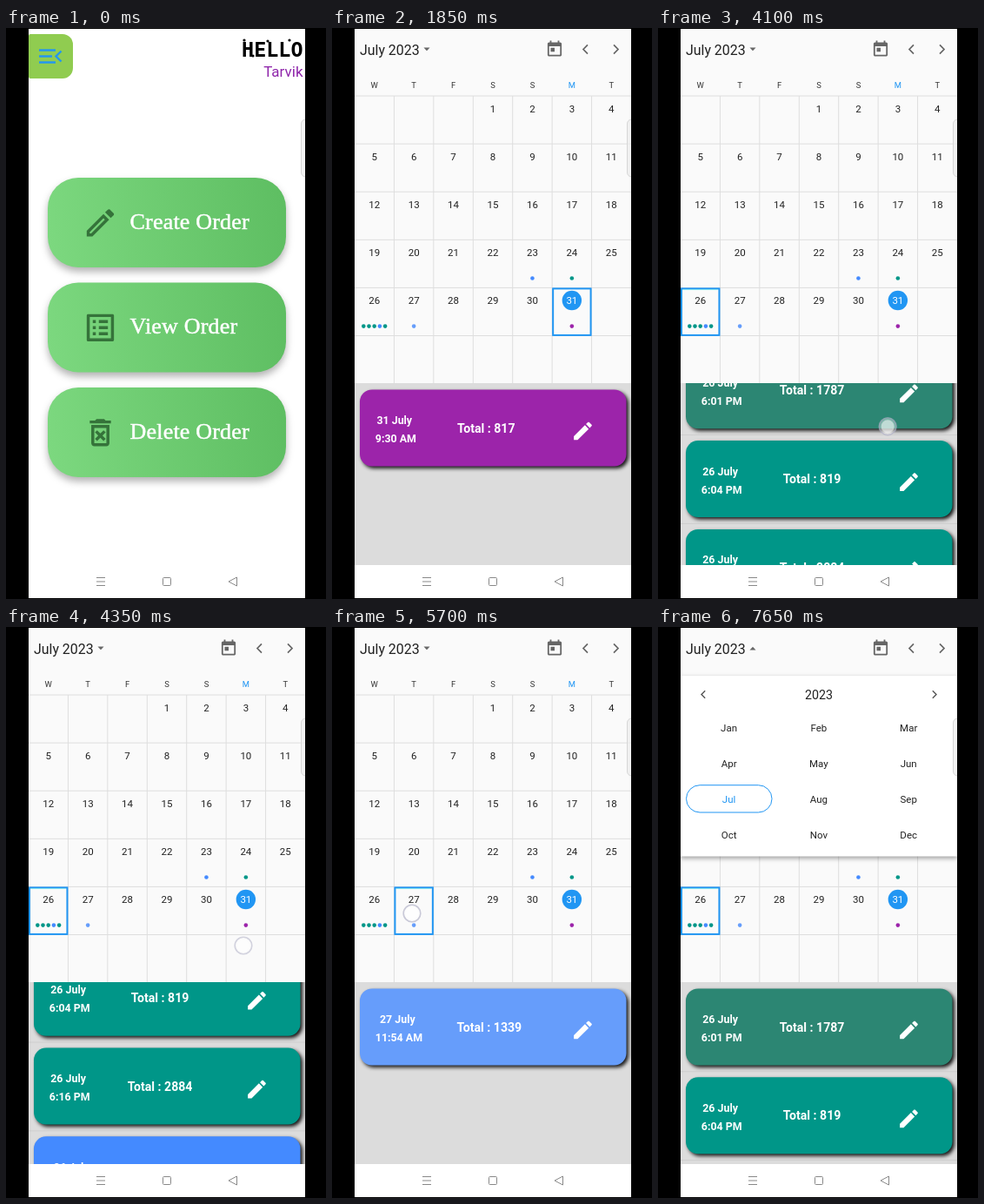
Recreate the animation shown at these times as an HTML page with a canvas. Size 368x656 px, loop 8000 ms.

```html
<!DOCTYPE html>
<html lang="en">
<head>
<meta charset="utf-8">
<title>Order calendar</title>
<style>
html, body { margin: 0; width: 100%; height: 100%; overflow: hidden; background: #000; }
canvas { display: block; width: 368px; height: 656px; }
</style>
</head>
<body>
<canvas id="stage"></canvas>
<script>
const LOOP = 8000;
const BLUE = '#2196f3', TEAL = '#009688', INK = '#222';
const SANS = 'Roboto, sans-serif', SERIF = '"Liberation Serif", serif';
const COL = 318 / 7, ROW = 55.1, GRID_TOP = 78, PITCH = 101.8;

const canvas = document.getElementById('stage');
const dpr = window.devicePixelRatio || 1;
canvas.width = 368 * dpr;
canvas.height = 656 * dpr;
const c = canvas.getContext('2d');

const icons = {
  edit: 'M3 17.25V21h3.75L17.81 9.94l-3.75-3.75L3 17.25zM20.71 7.04c.39-.39.39-1.02 0-1.41l-2.34-2.34c-.39-.39-1.02-.39-1.41 0l-1.83 1.83 3.75 3.75 1.83-1.83z',
  pencil: 'M14.06 9.02l.92.92L5.92 19H5v-.92l9.06-9.06M17.66 3c-.25 0-.51.1-.7.29l-1.83 1.83 3.75 3.75 1.83-1.83c.39-.39.39-1.02 0-1.41l-2.34-2.34c-.2-.2-.45-.29-.71-.29zm-3.6 3.19L3 17.25V21h3.75L17.81 9.94l-3.75-3.75z',
  list: 'M19 5v14H5V5h14m1.1-2H3.9c-.5 0-.9.4-.9.9v16.2c0 .4.4.9.9.9h16.2c.4 0 .9-.5.9-.9V3.9c0-.5-.5-.9-.9-.9zM11 7h6v2h-6zM11 11h6v2h-6zM11 15h6v2h-6zM7 7h2v2H7zM7 11h2v2H7zM7 15h2v2H7z',
  bin: 'M14.12 10.47L12 12.59l-2.13-2.12-1.41 1.41L10.59 14l-2.12 2.12 1.41 1.41L12 15.41l2.12 2.12 1.41-1.41L13.41 14l2.12-2.12zM15.5 4l-1-1h-5l-1 1H5v2h14V4zM6 19c0 1.1.9 2 2 2h8c1.1 0 2-.9 2-2V7H6v12zM8 9h8v10H8V9z',
  today: 'M19 3h-1V1h-2v2H8V1H6v2H5c-1.1 0-2 .9-2 2v14c0 1.1.9 2 2 2h14c1.1 0 2-.9 2-2V5c0-1.1-.9-2-2-2zm0 16H5V8h14v11zM7 10h5v5H7z'
};
for (const k in icons) icons[k] = new Path2D(icons[k]);

const orders = {
  31: [['9:30 AM', 817, '#9c24aa']],
  26: [['6:01 PM', 1787, '#2c8673'], ['6:04 PM', 819, TEAL], ['6:16 PM', 2884, TEAL],
       ['10:01 PM', 765, '#448aff'], ['10:04 PM', 1250, TEAL]],
  27: [['11:54 AM', 1339, '#669dfb']]
};
const marks = {
  23: ['#448aff'], 24: [TEAL], 26: [TEAL, TEAL, TEAL, '#448aff', TEAL],
  27: ['#669dfb'], 31: ['#9c24aa']
};
// start, end, from x, y, to x, y, move start, move end
const touches = [
  [640, 880, 205, 345, 205, 345, 0, 1],
  [3050, 3330, 57, 326, 57, 326, 0, 1],
  [3930, 4400, 260, 501, 273, 366, 3950, 4350],
  [4680, 5120, 253, 453, 262, 363, 4780, 5080],
  [5420, 5780, 92, 329, 92, 329, 0, 1],
  [6160, 6440, 57, 328, 57, 328, 0, 1],
  [6920, 7200, 72, 25, 72, 25, 0, 1]
];

const clamp = v => Math.max(0, Math.min(1, v));
const span = (t, a, b) => clamp((t - a) / (b - a));
const out = p => 1 - Math.pow(1 - p, 2.2);
const smooth = p => p * p * (3 - 2 * p);
const mix = (a, b, p) => a + (b - a) * p;

function rect(x, y, w, h, fill) {
  c.fillStyle = fill;
  c.fillRect(x, y, w, h);
}
function round(x, y, w, h, r) {
  c.beginPath();
  c.roundRect(x, y, w, h, r);
}
function dot(x, y, r, fill) {
  c.beginPath();
  c.arc(x, y, r, 0, 7);
  c.fillStyle = fill;
  c.fill();
}
function line(points, color, width = 1, close = false) {
  c.beginPath();
  points.forEach(([x, y]) => c.lineTo(x, y));
  if (close) c.closePath();
  c.strokeStyle = color;
  c.lineWidth = width;
  c.stroke();
}
function text(s, x, y, size, color = INK, align = 'center', weight = 400, family = SANS) {
  c.font = `${weight} ${size}px ${family}`;
  c.textAlign = align;
  c.fillStyle = color;
  c.fillText(s, x, y);
}
function icon(name, x, y, scale, color) {
  c.save();
  c.translate(x, y);
  c.scale(scale, scale);
  c.translate(-12, -12);
  c.fillStyle = color;
  c.fill(icons[name], 'evenodd');
  c.restore();
}
function shadow(color, blur, x, y) {
  c.shadowColor = color;
  c.shadowBlur = blur * dpr;
  c.shadowOffsetX = x * dpr;
  c.shadowOffsetY = y * dpr;
}
function clipped(x, y, w, h, draw) {
  c.save();
  c.beginPath();
  c.rect(x, y, w, h);
  c.clip();
  draw();
  c.restore();
}
function zoomed(scale, draw) {
  c.save();
  c.translate(185, 304.5);
  c.scale(scale, scale);
  c.translate(-185, -304.5);
  draw();
  c.restore();
}
function chevron(x, y, w, h, color, width) {
  line([[x - w, y - h], [x, y], [x - w, y + h]], color, width);
}

function homeButton(label, name, y) {
  const g = c.createLinearGradient(48, y + 20, 322, y - 20);
  g.addColorStop(0, '#7cd87f');
  g.addColorStop(1, '#5ebe62');
  c.save();
  shadow('rgba(0,0,0,.3)', 9, 0, 5);
  c.fillStyle = g;
  round(48, y - 51.5, 274, 103, 35);
  c.fill();
  c.restore();
  icon(name, 108.5, y + .3, 1.74, '#35733a');
  c.letterSpacing = '0.2px';
  text(label, 142.5, y + 7.3, 26, '#fff', 'left', 400, SERIF);
  c.strokeStyle = '#fff';
  c.lineWidth = .5;
  c.strokeText(label, 142.5, y + 7.3);
  c.letterSpacing = '0px';
}
function home() {
  rect(26, 0, 318, 617, '#fff');
  c.fillStyle = '#90cc50';
  round(26, 7, 51, 51, [2, 12, 12, 2]);
  c.fill();
  [[25.5, 57], [32.5, 53], [39.5, 57]].forEach(([y, x]) => line([[38, y], [x, y]], BLUE, 2.4));
  chevron(57.5, 32.5, -6, 6, BLUE, 2.4);
  text('HELLO', 341.5, 33, 23.4, '#000', 'right', 700, '"DejaVu Sans Mono", monospace');
  [[274, 14], [284, 32], [301, 15], [326, 14]].forEach(([x, y]) => dot(x, y, 1.6, '#000'));
  text('Tarvik', 341.5, 56, 17, '#8e24aa', 'right');
  homeButton('Create Order', 'pencil', 223.5);
  homeButton('View Order', 'list', 344);
  homeButton('Delete Order', 'bin', 464.5);
}

function loader(t) {
  rect(26, -8, 318, 625, '#fafafa');
  c.beginPath();
  c.arc(185, 304.5, 16, 0, 7);
  c.strokeStyle = '#fff';
  c.lineWidth = 3.5;
  c.stroke();
  const p = Math.max(0, t - 1050) / 1333;
  const tail = smooth(clamp(p * 2 - 1)) * 4.7 + p * 3 - Math.PI / 2;
  const head = smooth(clamp(p * 2)) * 4.7 + p * 3 - Math.PI / 2;
  c.beginPath();
  c.arc(185, 304.5, 16, tail - .11, head + .11);
  c.strokeStyle = BLUE;
  c.stroke();
}
function transition(t) {
  const p = span(t, 900, 1200), e = out(p);
  zoomed(1 + .06 * e, home);
  rect(26, 0, 318, 617, `rgba(0,0,0,${.45 * e})`);
  c.globalAlpha = clamp(p * 4);
  zoomed(.85 + .15 * e, () => loader(t));
  c.globalAlpha = 1;
}

function header(open) {
  rect(26, 0, 318, 56, '#fafafa');
  text('July 2023', 32, 30.5, 15.9, INK, 'left');
  const d = open ? -1 : 1;
  c.beginPath();
  c.moveTo(105.5, 24.5 - 2 * d);
  c.lineTo(112.5, 24.5 - 2 * d);
  c.lineTo(109, 24.5 + 1.8 * d);
  c.fillStyle = '#666';
  c.fill();
  icon('today', 256, 24.5, .9, '#666');
  chevron(289, 24.5, -5, 5.2, '#666', 1.7);
  chevron(329, 24.5, 5, 5.2, '#666', 1.7);
}
function grid(selected) {
  rect(26, 0, 318, 408, '#fafafa');
  [...'WTFSSMT'].forEach((d, i) =>
    text(d, 26 + COL * (i + .5), 69.3, 9.4, i === 5 ? BLUE : '#333'));
  for (let i = 0; i < 7; i++) {
    const y = GRID_TOP + ROW * i, x = 26 + COL * i;
    line([[26, y], [344, y]], '#dedede');
    if (i) line([[x, GRID_TOP], [x, 408]], '#dedede');
  }
  for (let n = 1; n <= 31; n++) {
    const col = (n + 2) % 7, row = Math.floor((n + 2) / 7);
    const x = 26 + COL * (col + .5), y = GRID_TOP + ROW * row + 14.4;
    if (n === 31) dot(x, y + .2, 11.2, BLUE);
    text(n, x, y + 4.1, 11.5, n === 31 ? '#fff' : INK);
    const m = marks[n] || [];
    m.forEach((color, i) => dot(x + (i - (m.length - 1) / 2) * 6.2, y + 29.8, 2.3, color));
    if (n === selected) {
      const left = x - COL / 2 + 1, top = y - 13.4;
      c.strokeStyle = BLUE;
      c.lineWidth = 2;
      c.strokeRect(left, top, COL - 2, ROW - 1.6);
      if (n !== 31) line([[left + 1.5, top + 1.2], [left + COL - 4, top + 1.2]], '#7fe3ee');
    }
  }
}
function card([time, total, color], day, y) {
  c.save();
  shadow('rgba(0,0,0,.9)', 4, 2.5, 2.5);
  c.fillStyle = color;
  round(32, y, 306.5, 88, 14);
  c.fill();
  c.restore();
  c.font = `700 12.4px ${SANS}`;
  const half = c.measureText(time).width / 2;
  text(day + ' July', 48.2 + half, y + 39.5, 12.4, '#fff', 'center', 700);
  text(time, 49.8 + half, y + 60.5, 12.4, '#fff', 'center', 700);
  text('Total : ' + total, 153.7 + half, y + 49, 14.1, '#fff', 'center', 700);
  icon('edit', 288.5, y + 47.5, 1.15, '#fff');
}
function agenda(day, offset) {
  clipped(26, 408, 318, 209, () => {
    rect(26, 408, 318, 209, '#dcdcdc');
    orders[day].forEach((order, i) => {
      const y = 415.5 + i * PITCH - offset;
      if (i) line([[26, y - 6.5], [344, y - 6.5]], '#cecece');
      card(order, day, y);
    });
  });
}
function picker(p) {
  const h = 207.5 * p;
  c.save();
  shadow('rgba(0,0,0,.35)', 5, 0, 2);
  rect(26, 56, 318, h, '#fff');
  c.restore();
  clipped(26, 56, 318, h, () => {
    text('2023', 185, 82.5, 14.2);
    chevron(50, 77.5, -4.2, 4.2, '#555', 1.4);
    chevron(320, 77.5, 4.2, 4.2, '#555', 1.4);
    'Jan Feb Mar Apr May Jun Jul Aug Sep Oct Nov Dec'.split(' ').forEach((m, i) => {
      text(m, 81.6 + (i % 3) * 103.3, 119.8 + Math.floor(i / 3) * 40.9, 11.5, m === 'Jul' ? BLUE : INK);
    });
    c.strokeStyle = BLUE;
    c.lineWidth = 1;
    round(32.5, 181.7, 98.5, 31.3, 15.6);
    c.stroke();
  });
}
function scroll(t) {
  if (t < 4350) return 135 * smooth(span(t, 3950, 4350));
  if (t < 4780) return mix(135, 218, out(span(t, 4350, 4680)));
  return mix(218, 308, smooth(span(t, 4780, 5080)));
}
function calendar(t) {
  const day = t < 3300 ? 31 : t >= 5500 && t < 6300 ? 27 : 26;
  grid(day);
  agenda(day, t < 5500 ? scroll(t) : 0);
  const open = smooth(span(t, 7150, 7450));
  header(open > 0);
  if (open > 0) picker(open);
}

function touch(t, [start, end, x0, y0, x1, y1, from, to]) {
  if (t < start || t > end) return;
  const p = smooth(span(t, from, to));
  const x = mix(x0, x1, p), y = mix(y0, y1, p);
  c.save();
  c.globalAlpha = Math.min(span(t, start, start + 60), span(end, t, t + 60));
  dot(x, y, 10.5, 'rgba(255,255,255,.4)');
  dot(x, y, 7.5, 'rgba(255,255,255,.5)');
  c.beginPath();
  c.arc(x, y, 9.8, 0, 7);
  c.strokeStyle = 'rgba(150,150,180,.5)';
  c.lineWidth = 1.6;
  c.stroke();
  c.restore();
}
function sidePanel() {
  c.fillStyle = 'rgba(238,238,238,.7)';
  c.strokeStyle = '#d6d6d6';
  c.lineWidth = 1;
  round(339.5, 105, 16, 66, 5);
  c.fill();
  c.stroke();
}
function navBar() {
  rect(26, 617, 318, 38, '#fff');
  [631.5, 636, 640.5].forEach(y => line([[104, y], [114, y]], '#888'));
  c.strokeStyle = '#888';
  round(180.5, 631.5, 9, 9, 1);
  c.stroke();
  line([[256, 636], [265.5, 631], [265.5, 641]], '#888', 1, true);
}

function draw(t) {
  c.setTransform(dpr, 0, 0, dpr, 0, 0);
  rect(0, 0, 368, 656, '#000');
  clipped(26, 1, 318, 654, () => {
    if (t < 900) home();
    else if (t < 1500) transition(t);
    else calendar(t);
    sidePanel();
    navBar();
    touches.forEach(f => touch(t, f));
  });
}
function frame(now) {
  draw(now % LOOP);
  requestAnimationFrame(frame);
}
requestAnimationFrame(frame);
</script>
</body>
</html>
```
